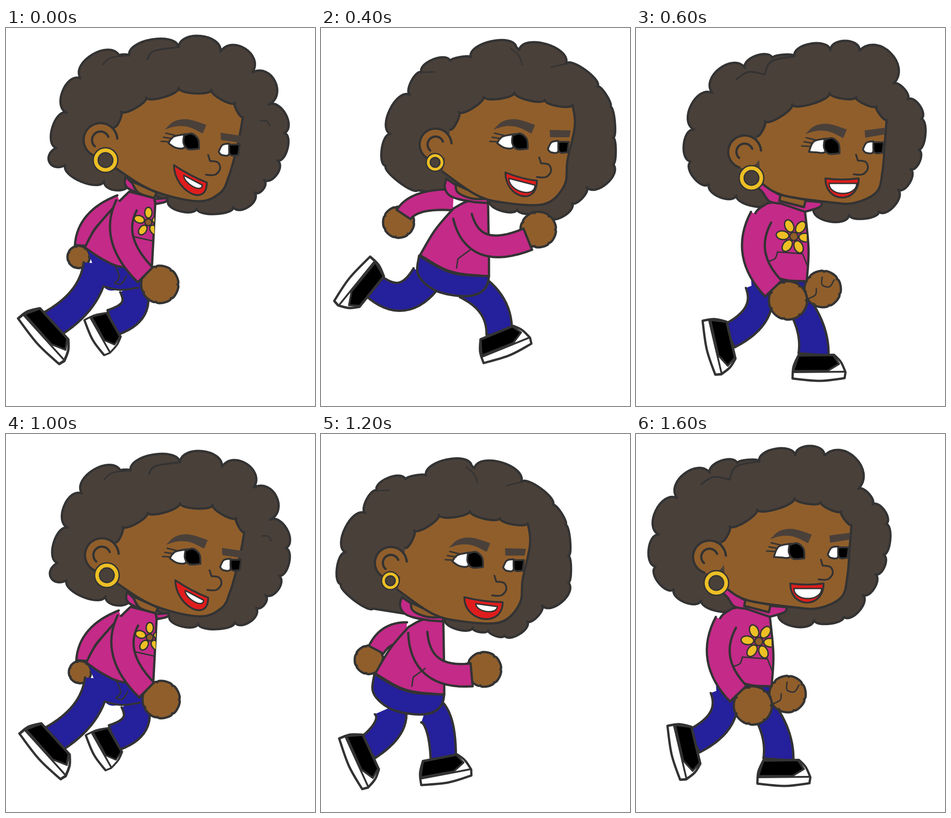
An HTML page with a canvas for the animation above (1.8 s loop, 677 px wide and 827 px high).

```html
<!DOCTYPE html>
<html lang="en">
<head>
<meta charset="utf-8">
<title>Run cycle</title>
<style>
html, body { margin: 0; width: 100%; height: 100%; overflow: hidden; background: #fff; }
canvas { display: block; }
</style>
</head>
<body>
<canvas id="stage" width="677" height="827"></canvas>
<script>
const ctx = document.getElementById('stage').getContext('2d');
const INK = '#333333', HAIR = '#4a403a', SKIN = '#905e2b', PINK = '#c42a88', BLUE = '#25209b';
const RED = '#df1d1d', YELLOW = '#edbf25', BLACK = '#000000', WHITE = '#ffffff';
const LINE = 5, THIN = 3;

// ---- Drawing helpers ----

function paint(path, fill, width = LINE, color = INK) {
  if (fill) { ctx.fillStyle = fill; ctx.fill(path); }
  if (width) { ctx.strokeStyle = color; ctx.lineWidth = width; ctx.stroke(path); }
}

function at(x, y, draw) {
  ctx.save();
  ctx.translate(x, y);
  draw();
  ctx.restore();
}

const points = text => text.split(' ').map(t => t.replace('!', '').split(',').map(Number));
const mix = (a, b, t) => [a[0] + (b[0] - a[0]) * t, a[1] + (b[1] - a[1]) * t];
const ghost = (a, b, c) => [0, 1].map(i => 2.25 * a[i] - 1.5 * b[i] + 0.25 * c[i]);

// Smooth run through the points between two corners.
function addRun(path, run) {
  const n = run.length;
  if (n === 2) return path.lineTo(...run[1]);
  const q = [ghost(...run), ...run, ghost(run[n - 1], run[n - 2], run[n - 3])];
  for (let i = 1; i < n; i++) {
    const out = [0, 1].map(k => q[i][k] + (q[i + 1][k] - q[i - 1][k]) / 6);
    const into = [0, 1].map(k => q[i + 1][k] + (q[i][k] - q[i + 2][k]) / 6);
    path.bezierCurveTo(...out, ...into, ...q[i + 1]);
  }
}

// Smooth shape; a point marked with ! is a corner.
function outline(text, closed) {
  const pts = points(text), corners = text.split(' ').map(t => t.endsWith('!'));
  if (closed) pts.push(pts[0]);
  const path = new Path2D();
  path.moveTo(...pts[0]);
  for (let i = 1, from = 0; i < pts.length; i++) {
    if (corners[i] || i === pts.length - 1) {
      addRun(path, pts.slice(from, i + 1));
      from = i;
    }
  }
  if (closed) path.closePath();
  return path;
}

const shape = (fill, text, width) => paint(outline(text, true), fill, width);
const line = (text, width = THIN) => paint(outline(text, false), null, width);

// Row of round lobes; k is the height of a lobe as a share of its chord.
function addLobes(path, pts, k) {
  for (let i = 1; i < pts.length; i++) {
    const [ax, ay] = pts[i - 1], [bx, by, own = k] = pts[i];
    const nx = (by - ay) * own * 4 / 3, ny = (ax - bx) * own * 4 / 3;
    path.bezierCurveTo(ax + nx, ay + ny, bx + nx, by + ny, bx, by);
  }
}

function hair(text, k) {
  const pts = points(text), path = new Path2D();
  path.moveTo(...pts[0]);
  addLobes(path, pts, k);
  path.closePath();
  paint(path, HAIR);
}

function face(hairline, jaw) {
  const pts = points(hairline), path = new Path2D();
  path.moveTo(...pts[0]);
  addLobes(path, pts, -0.14);
  path.addPath(new Path2D());
  const all = outline(jaw, false);
  const fill = new Path2D(path);
  const last = pts[pts.length - 1];
  fill.lineTo(...last);
  const run = points(jaw);
  addRun(fill, [last, ...run]);
  paint(fill, SKIN);
}

// Tapered limb around a quadratic centre line, open where it joins the body.
function limb(fill, text, w0, w1) {
  const [a, b, c] = points(text), sides = [[], []];
  for (let i = 0; i <= 16; i++) {
    const t = i / 16, p = mix(a, b, t), q = mix(b, c, t), [x, y] = mix(p, q, t);
    const turn = Math.atan2(q[1] - p[1], q[0] - p[0]), half = (w0 + (w1 - w0) * t) / 2;
    const dx = -Math.sin(turn) * half, dy = Math.cos(turn) * half;
    sides[0].push([x + dx, y + dy]);
    sides[1].unshift([x - dx, y - dy]);
  }
  const path = new Path2D();
  sides.flat().forEach(p => path.lineTo(...p));
  paint(path, fill);
}

function fist(x, y, r, turn = 0) {
  const ring = Array.from({ length: 8 }, (_, i) => {
    const a = turn + i / 7 * Math.PI * 2;
    return [x + Math.cos(a) * r * 0.92, y + Math.sin(a) * r * 0.92];
  });
  const path = new Path2D();
  path.moveTo(...ring[0]);
  addLobes(path, ring, 0.18);
  path.closePath();
  paint(path, SKIN);
}

// Side view of a shoe, laid from heel to toe.
function shoe(hx, hy, tx, ty) {
  ctx.save();
  ctx.translate(hx, hy);
  ctx.rotate(Math.atan2(ty - hy, tx - hx));
  ctx.scale(Math.hypot(tx - hx, ty - hy) / 115, 1);
  shape(WHITE, '0,-2 2,-28 13,-53! 91,-54! 106,-38 116,-16! 114,-3! 60,3');
  shape(BLACK, '2,-19 13,-52! 89,-53! 102,-34! 77,-19!', 4);
  line('0,-16 114,-17', 4);
  ctx.restore();
}

function ellipse(x, y, rx, ry, turn, fill, width) {
  const path = new Path2D();
  path.ellipse(x, y, rx, ry, turn, 0, Math.PI * 2);
  paint(path, fill, width);
}

function earring(x, y, r, band) {
  const path = new Path2D();
  path.arc(x, y, r, 0, Math.PI * 2);
  paint(path, HAIR, band + 6);
  paint(path, null, band, YELLOW);
}

function ear(x, y, r) {
  ellipse(x, y, r, r, 0, SKIN, 0);
  for (const [size, from, to] of [[r, 1.9, 6.2], [r / 2, 2.3, 5.9]]) {
    const path = new Path2D();
    path.arc(x, y, size, from, to);
    paint(path);
  }
}

// Eye and brow, placed by the pupil.
function nearEye(x, y, droop) {
  at(x, y, () => {
    shape(HAIR, '-59,-26 -38,-44 -8,-48 32,-36! 24,-17! -6,-31 -33,-33', 0);
    shape(WHITE, `-51,${droop} -40,-10 -12,-16! -16,13 -35,14`, 4);
    shape(BLACK, '-17,-13 0,-17 14,-5 16,16! -8,17 -18,4', 4);
    for (let i = 0; i < 3; i++) line(`${-67 + i * 5},${-i * 9} ${-50 + i * 7},${1 - i * 7}`);
  });
}

function farEye(x, y, tilt) {
  at(x, y, () => {
    shape(HAIR, `-30,-37 16,${-36 + tilt}! 13,${-21 + tilt}! -29,-21!`, 0);
    shape(WHITE, '-34,5 -26,-10 -11,-13! -12,11 -27,12', 4);
    shape(BLACK, '-11,-11 12,-11! 9,12! -9,11', 4);
  });
}

const nose = (x, y) => at(x, y, () => line('0,0 4,13! 21,16 26,30 15,43 -5,43', 4));

function bowl(a, b, sag, depth) {
  const path = new Path2D(), drop = (p, d) => [p[0], p[1] + d];
  path.moveTo(...a);
  path.quadraticCurveTo(...drop(mix(a, b, 0.5), sag), ...b);
  path.bezierCurveTo(...drop(b, depth * 4 / 3), ...drop(a, depth * 4 / 3), ...a);
  return path;
}

function mouth(text, open) {
  const [a, b] = points(text), [t0, t1] = open ? [0.11, 0.94] : [0.3, 0.86];
  const inset = t => { const p = mix(a, b, t); return [p[0], p[1] + 11]; };
  paint(bowl(a, b, 5, 42), RED, 4);
  paint(bowl(inset(t0), inset(t1), 0, open ? 22 : 14), WHITE, THIN);
}

function flower(x, y, petals, reach, edge) {
  ctx.save();
  ctx.beginPath();
  ctx.rect(0, 0, edge, 827);
  ctx.clip();
  for (let i = 0; i < petals; i++) {
    const a = i / petals * Math.PI * 2 - Math.PI / 2 - (petals > 5 ? 0.42 : 0);
    ellipse(x + Math.cos(a) * reach, y + Math.sin(a) * reach, reach * 0.56, reach * 0.38, a, YELLOW, THIN);
  }
  ellipse(x, y, reach * 0.36, reach * 0.36, 0, SKIN, THIN);
  ctx.restore();
}

// ---- Poses ----

function run({ backLeg, frontLeg, backArm, frontArm, backFist, frontFist, heel, toe, grin }) {
  hair('212,355 142,302,.12 152,232 195,146,.26 220,97 283,72,.25 328,64,.1 428,42,.24 434,48,0 537,78,.27 606,128,.16 634,172,.12 640,240,.1 640,298,.1 582,348,.3 550,383 500,414,.25 465,402 430,397 370,380', 0.2);
  line('416,45 433,60 441,80');
  line('220,97 248,96');
  line('504,86 537,78');

  fist(...backFist);
  limb(PINK, backArm, 46, 36);
  limb(BLUE, backLeg, 70, 55);
  limb(BLUE, frontLeg, 66, 55);
  shape(BLUE, '215,498 285,535 368,543! 362,566 340,583 300,586 248,573 213,540');
  shoe(...heel);
  shoe(...toe);
  shape(PINK, '290,395 250,442 217,497! 285,533 368,543! 368,505! 366,380! 325,378');
  fist(...frontFist);
  limb(PINK, frontArm, 42, 50);
  line('326,486 300,505! 297,525');

  shape(PINK, '275,330 271,348 280,365 300,374 336,381! 366,383! 365,372! 320,362 297,345');
  shape(SKIN, '295,342 330,358 368,374! 330,373 300,360');
  face('283,222 302,184 356,150 424,141 490,157 551,168', '556,215 540,290 533,345 490,385 400,382 340,365 266,314');
  ear(251, 255, 35);
  earring(250, 294, 15, 6);
  nearEye(437, 248, 4);
  farEye(531, 260, 0);
  nose(478, 283);
  mouth(grin ? '404,316 473,334' : '412,330 496,341', grin);
}

const STRIDE = {
  backLeg: '232,545 182,620 115,564', frontLeg: '320,560 395,600 390,673',
  backArm: '290,376 205,372 181,408', frontArm: '310,412 335,510 453,462',
  backFist: [170, 425, 35], frontFist: [476, 441, 40],
  heel: [106, 499, 26, 596], toe: [357, 735, 463, 693], grin: true
};
const STRIDE_LOW = { ...STRIDE, backLeg: '235,560 172,614 101,596', heel: [56, 551, 40, 671] };
const JOG = {
  backLeg: '248,572 266,613 200,660', frontLeg: '328,573 365,585 366,689',
  backArm: '285,408 240,405 219,445', frontArm: '310,407 316,510 428,500',
  backFist: [203, 467, 32], frontFist: [455, 488, 39],
  heel: [136, 640, 186, 752], toe: [318, 743, 429, 723], grin: false
};

function upright(passing) {
  hair('235,380 168,362,.2 108,338 68,288 75,218 115,138,.33 187,83,.36 247,62 295,58,.12 374,45 438,45,.33 512,118,.42 543,152,.22 573,195 567,262,.18 549,305 522,350 480,398 415,405,.18 337,392', 0.27);
  line('168,108 195,92 230,98! 245,69 295,58', 4);

  if (passing) {
    limb(BLUE, '214,555 241,625 152,670', 54, 55);
    shoe(92, 637, 119, 756);
  } else {
    limb(BLUE, '265,590 270,651 244,710', 62, 68);
  }
  limb(BLUE, passing ? '290,580 342,646 337,710' : '314,585 338,651 337,710', 50, 66);
  shape(BLUE, '200,545 215,600 297,598! 322,580! 322,545!', 0);
  shoe(291, 765, 406, 765);
  if (!passing) shoe(187, 765, 302, 765);
  fist(357, 567, 41, 0.3);
  line('356,541 356,558 372,562 382,547');
  line('326,588 341,580 343,566');
  shape(PINK, '235,380 205,410 190,500 210,545 245,539! 280,548 322,550! 326,480 318,395! 262,378');
  line('240,506 253,500 258,486! 313,490! 324,518!');
  flower(294, 452, 6, 25, 322);
  if (passing) fist(281, 592, 43);
  else fist(252, 580, 43);
  limb(PINK, passing ? '222,410 178,492 249,566' : '222,410 170,495 226,553', 50, 50);

  shape(PINK, '212,343 225,355 240,375 265,380! 318,398! 350,388 355,377! 320,374! 265,362 222,335');
  shape(SKIN, '265,360 320,372! 316,388! 262,374!');
  face('213,233 230,200 290,163 372,138 430,147 475,167 497,197', '493,250 488,310 475,355 425,379 370,377 270,362 222,335');
  ear(186, 267, 36);
  earring(201, 324, 21.5, 8);
  nearEye(378, 254, 13);
  farEye(479, 257, -7);
  nose(430, 273);
  mouth(passing ? '363,325 436,325' : '365,326 446,327', passing);
}

function leap() {
  hair('270,340 215,335 130,300,.22 110,262,.65 133,185,.26 163,110 248,60 270,60,.1 378,42,.24 470,52 540,97,.42 575,168,.45 610,230 595,290,.24 565,332 545,360 498,392 418,395,.17 355,380,.22', 0.32);
  line('310,68 325,50 378,42', 4);
  line('212,80 230,65 270,60');
  line('558,203 572,204 578,214');

  fist(159, 501, 25);
  limb(PINK, '250,382 171,412 166,476', 34, 30);
  limb(BLUE, '275,565 305,622 231,645', 56, 58);
  limb(BLUE, '197,515 189,598 95,651', 54, 62);
  shape(BLUE, '177,483 230,510 310,530! 295,568! 250,573 213,565', 0);
  line('213,565 250,573 290,568', 4);
  line('240,522 248,545 238,558! 252,560 264,543');
  shoe(25, 637, 115, 738);
  shoe(170, 640, 213, 718);
  shape(PINK, '270,358 240,388 195,440 173,480! 210,505 255,523 320,518! 327,385! 325,372!');
  line('282,457 322,466');
  flower(312, 425, 5, 21, 325);
  fist(337, 561, 42);
  limb(PINK, '264,388 227,462 305,540', 50, 46);

  shape(PINK, '262,325 261,342 275,355 325,372! 290,352 272,335');
  shape(SKIN, '275,335 330,360! 325,372! 290,360');
  shape(PINK, '325,374 354,372! 350,380 328,385!');
  face('237,217 252,183 307,152 378,131 450,135 502,164 519,195', '511,240 500,285 488,325 470,360 420,379 320,355 238,305');
  ear(207, 245, 37);
  earring(218, 289, 21.5, 8);
  nearEye(407, 248, 4);
  farEye(500, 266, 6);
  nose(443, 278);
  mouth('368,300 440,338', false);
}

// ---- Timeline ----

const STEP = 200;
const STEPS = [
  [0, 0, leap], [-119, -11, () => run(JOG)], [0, 0, () => run(STRIDE)],
  [52, 4, () => upright(true)], [0, 0, () => upright(false)], [3, 20, leap],
  [-98, 27, () => run(JOG)], [-18, -11, () => run(STRIDE_LOW)], [-25, 2, () => upright(true)]
];

const start = performance.now();
let shown = -1;
ctx.lineCap = ctx.lineJoin = 'round';

function tick() {
  const step = Math.floor((performance.now() - start) / STEP) % STEPS.length;
  if (step !== shown) {
    shown = step;
    ctx.clearRect(0, 0, 677, 827);
    at(...STEPS[step]);
  }
  requestAnimationFrame(tick);
}
tick();
</script>
</body>
</html>
```
